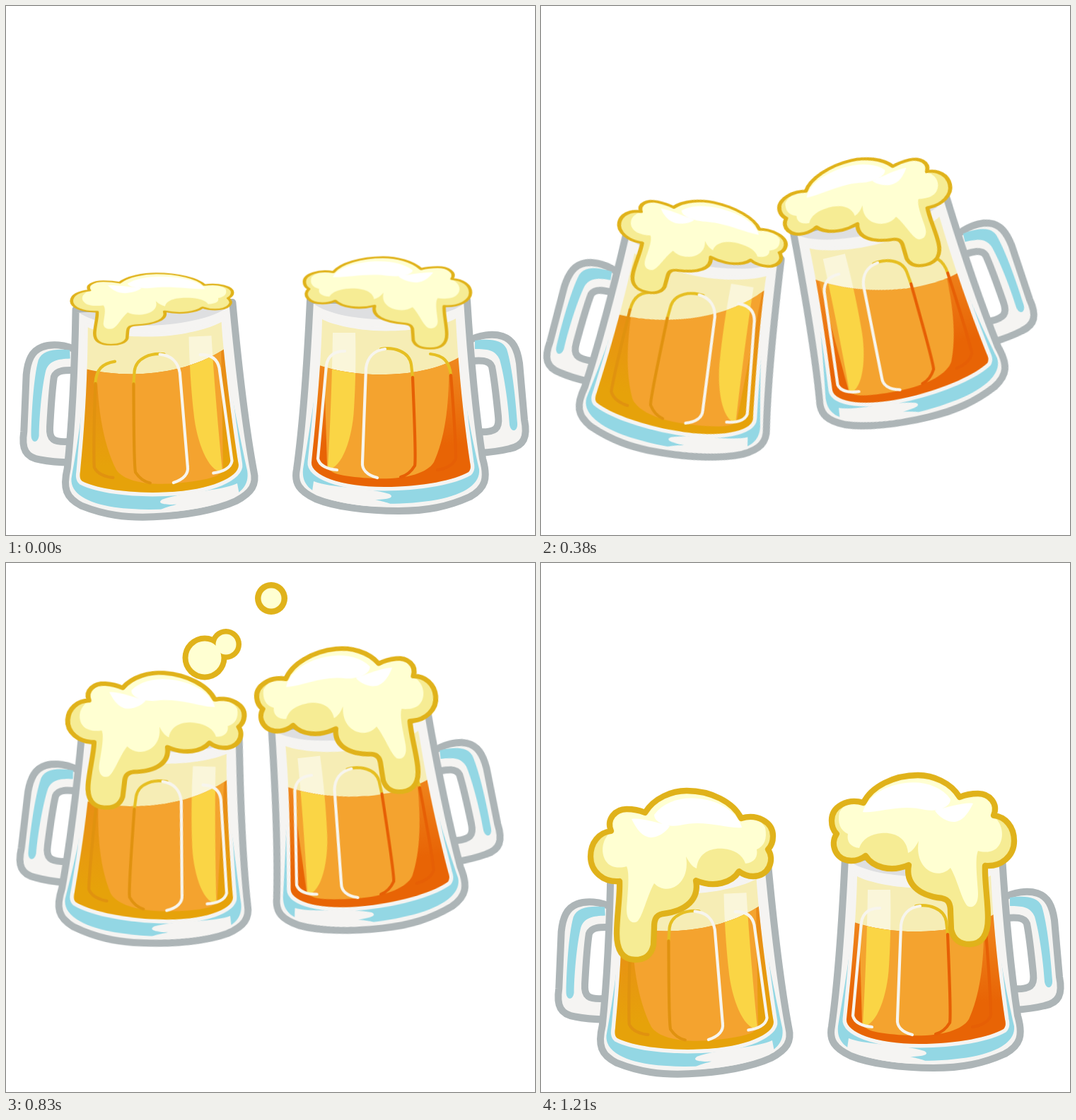
An HTML page that plays this animation: 748x748 px, repeating every 1250 ms.

```html
<!DOCTYPE html>
<html lang="en">
<head>
<meta charset="utf-8">
<title>Cheers</title>
<style>
@property --x { syntax: "<length>"; inherits: true; initial-value: 0px; }
@property --y { syntax: "<length>"; inherits: true; initial-value: 0px; }
@property --a { syntax: "<angle>"; inherits: true; initial-value: 0deg; }
@property --sink { syntax: "<length>"; inherits: true; initial-value: 0px; }

html, body { margin: 0; width: 100%; height: 100%; overflow: hidden; background: #fff; }
svg { display: block; width: 100%; height: 100%; }

/* 30 steps per loop; the delay snaps step starts to 10 ms */
.mug, .foam, .drop { animation: 1250ms steps(30) -5ms infinite; }
.mug { transform: translate(var(--x), var(--y)) rotate(var(--a)); }
.level { transform: translateY(var(--sink)) rotate(calc(-1 * var(--a))); }

.left { --dark: #e0920f; --deep: url(#amber); transform-origin: 215px 560px; animation-name: left; }
.right { --dark: #e65f05; --deep: url(#copper); transform-origin: 545px 555px; animation-name: right; }
.left .level { transform-origin: 210px 520px; }
.right .level { transform-origin: 540px 522px; }
.left .foam { transform-origin: 262px 419px; animation-name: foam-left; }
.right .foam { transform-origin: 533px 420px; animation-name: foam-right; }
.single { animation-name: single; }
.pair { animation-name: pair; }

.edge { fill: #f5f4f2; stroke: #adb5b7; stroke-width: 10; stroke-linejoin: round; }
.line { fill: none; stroke-width: 4.2; stroke-linecap: round; }
.white { stroke: #f7f5ee; }
.gold { stroke: #e6bf22; }
.dark { stroke: var(--dark); }
.crust { fill: none; stroke: #e0b21a; stroke-linejoin: round; vector-effect: non-scaling-stroke; }

@keyframes left {
  0% { --x: 0px; --y: 0px; --a: 0deg; --sink: 0px; animation-timing-function: steps(6); }
  20% { --x: -2px; --y: -63px; --a: 5deg; --sink: 4px; animation-timing-function: steps(4); }
  33.333% { --x: -10px; --y: -94px; --a: 14.5deg; --sink: 12px; animation-timing-function: steps(2); }
  40% { --x: -9px; --y: -104px; --a: 14.5deg; --sink: 14px; animation-timing-function: steps(4); }
  53.333% { --x: -6px; --y: -180px; --a: 9deg; --sink: 15px; animation-timing-function: steps(4); }
  66.667% { --x: -1px; --y: -184px; --a: 4.3deg; --sink: 8px; animation-timing-function: steps(4); }
  80% { --x: 0px; --y: -179px; --a: 0deg; --sink: 0px; animation-timing-function: steps(2); }
  86.667% { --x: 0px; --y: -64px; --a: 0deg; --sink: 0px; animation-timing-function: steps(1); }
  90% { --x: 0px; --y: -28px; --a: 0deg; --sink: 0px; animation-timing-function: steps(2); }
  96.667%, 100% { --x: 0px; --y: 0px; --a: 0deg; --sink: 0px; }
}
@keyframes right {
  0% { --x: 0px; --y: 0px; --a: 0deg; --sink: 0px; animation-timing-function: steps(6); }
  20% { --x: -19px; --y: -102px; --a: -6.8deg; --sink: 1px; animation-timing-function: steps(6); }
  40% { --x: -69px; --y: -150px; --a: -20deg; --sink: 8px; animation-timing-function: steps(4); }
  53.333% { --x: -83px; --y: -189px; --a: -14.5deg; --sink: 6px; animation-timing-function: steps(4); }
  66.667% { --x: -40px; --y: -195.5px; --a: -6.3deg; --sink: 4px; animation-timing-function: steps(4); }
  80% { --x: -2px; --y: -198px; --a: 0deg; --sink: 0px; animation-timing-function: steps(2); }
  86.667% { --x: -1px; --y: -71px; --a: 0deg; --sink: 0px; animation-timing-function: steps(1); }
  90% { --x: 0px; --y: -31px; --a: 0deg; --sink: 0px; animation-timing-function: steps(2); }
  96.667%, 100% { --x: 0px; --y: 0px; --a: 0deg; --sink: 0px; }
}
@keyframes foam-left {
  from { transform: scale(.882, .422); stroke-width: 5.2px; }
  to { transform: scale(1.004, 1.02); stroke-width: 8.4px; }
}
@keyframes foam-right {
  0% { transform: scale(.911, .54); stroke-width: 5.2px; animation-timing-function: steps(16); }
  53.333% { transform: scale(.965, .83); stroke-width: 7px; animation-timing-function: steps(14); }
  100% { transform: scale(1.003, 1.013); stroke-width: 8.4px; }
}
@keyframes single {
  0%, 33.333% { transform: translate(361px, 245px) scale(0); animation-timing-function: steps(2); }
  40% { transform: translate(361px, 202px) scale(.8); animation-timing-function: steps(4); }
  53.333% { transform: translate(372px, 104px) scale(.96); animation-timing-function: steps(4); }
  66.667% { transform: translate(375px, 50px) scale(1); animation-timing-function: steps(2); }
  73.333% { transform: translate(373px, 38px) scale(.88); animation-timing-function: steps(2); }
  80% { transform: translate(368px, 60px) scale(.6); animation-timing-function: steps(2); }
  86.667% { transform: translate(367px, 74px) scale(.3); animation-timing-function: steps(1); }
  90%, 100% { transform: translate(367px, 80px) scale(0); }
}
@keyframes pair {
  0%, 33.333% { transform: translate(270px, 330px) scale(0); animation-timing-function: steps(2); }
  40% { transform: translate(271px, 283px) scale(.78); animation-timing-function: steps(4); }
  53.333% { transform: translate(277px, 189px) scale(1); animation-timing-function: steps(4); }
  66.667% { transform: translate(281px, 134px) scale(1); animation-timing-function: steps(2); }
  73.333% { transform: translate(281px, 128px) scale(.85); animation-timing-function: steps(2); }
  80% { transform: translate(278px, 143px) scale(.59); animation-timing-function: steps(2); }
  86.667% { transform: translate(277px, 165px) scale(.28); animation-timing-function: steps(1); }
  90%, 100% { transform: translate(277px, 175px) scale(0); }
}
</style>
</head>
<body>
<svg viewBox="0 0 748 748">
  <defs>
    <linearGradient id="amber" gradientUnits="userSpaceOnUse" x1="0" y1="490" x2="0" y2="640">
      <stop stop-color="#e98a18"/><stop offset="1" stop-color="#e6a20a"/>
    </linearGradient>
    <linearGradient id="copper" gradientUnits="userSpaceOnUse" x1="0" y1="490" x2="0" y2="620">
      <stop stop-color="#f08a20"/><stop offset="1" stop-color="#e86405"/>
    </linearGradient>

    <path id="bowl" d="M124 442C150 456 200 461 240 459C270 457 300 450 313 443C314 500 322 590 328 645C330 662 290 680 225 680C170 680 125 670 106 659C102 655 103 650 104 645C112 590 120 520 124 442Z"/>
    <path id="stripe" d="M266 462H298C299 540 303 620 305 655C285 655 270 610 268 570C266 540 265 500 266 462Z"/>
    <clipPath id="inside"><use href="#bowl"/></clipPath>

    <g id="glass">
      <path class="edge" fill-rule="evenodd" d="M108 475C92 464 70 463 58 467C43 472 37 485 34 505L27 585C22 610 28 622 48 626C60 629 75 631 92 632L96 602C66 604 62 597 64 580C66 560 69 530 73 510C77 500 90 501 104 502Z"/>
      <path fill="#93d7e4" d="M97 473C75 470 58 472 52 485C44 510 39 560 37 590C36 602 46 604 48 592C50 560 56 520 62 500C68 486 80 485 97 485Z"/>
      <path class="edge" d="M108 416C104 480 98 560 86 640C78 668 82 682 104 694C135 708 165 714 205 714C250 714 295 708 322 697C345 686 353 675 349 655C340 590 334 500 330 416Z"/>
      <path fill="#dedfe1" d="M113 421C150 451 285 451 325 421Z"/>
      <path fill="#93d7e4" d="M119 490C112 560 101 610 91 655C89 675 110 690 150 698C200 707 260 705 300 696C330 688 342 676 340 655C334 620 326 570 321 530L300 500Z"/>
      <path fill="#f5f4f2" d="M325 672C300 682 250 680 218 690C208 696 225 698 238 698C225 701 208 705 215 708C260 709 310 700 327 686Z"/>
      <use href="#bowl" fill="#f6edb5" stroke="#f5f4f2" stroke-width="11"/>
      <use href="#bowl" fill="#f6edb5"/>
      <use href="#stripe" fill="#fff" opacity=".5"/>
    </g>

    <g id="beer" clip-path="url(#inside)">
      <rect x="90" y="430" width="250" height="260" style="fill:var(--deep)"/>
      <path fill="#f4a32f" d="M136 440C130 540 135 600 155 645C165 662 200 670 240 668C280 666 305 662 306 650L312 440Z"/>
      <use href="#stripe" fill="#fad545"/>
    </g>

    <g id="panels" class="line">
      <path class="gold" d="M160 492C142 494 133 502 131 522"/>
      <path class="dark" d="M131 522C128 560 124 610 124 640C128 650 140 655 150 656"/>
      <path class="gold" d="M230 485C212 482 190 488 187 507L185 525"/>
      <path class="dark" d="M185 525C182 600 180 640 182 650C188 660 194 664 202 666"/>
      <path class="white" d="M235 667C250 663 257 655 256 645L251 512C249 497 240 487 224 485"/>
      <path class="white" d="M281 488C298 488 305 496 307 508L319 640C317 650 305 655 292 656"/>
    </g>

    <path id="puff" d="M147 353C160 332 185 322 206 322C240 322 272 338 283 361C305 354 328 366 328 386C328 394 325 401 321 405C331 420 322 443 300 443C292 443 285 440 280 436C270 452 245 460 219 449C224 475 206 492 172 496C162 498 160 505 160 515L159 540C156 555 146 561 133 561C115 561 107 547 107 524C107 500 112 470 111 450C88 452 70 436 70 415C70 395 82 381 99 379C92 362 105 348 121 348C131 348 140 350 147 353Z"/>
    <g id="head">
      <use href="#puff" fill="#f6ec94" stroke="none"/>
      <path fill="#ffffd2" stroke="none" d="M97 382C86 392 84 410 92 422C98 431 110 432 121 429C126 440 122 470 121 490C121 505 128 511 136 507C144 500 150 470 160 453C178 472 212 455 205 415C210 425 215 430 220 432C222 410 240 402 258 404C272 405 285 412 289 425C302 424 307 415 305 405C316 400 320 390 317 374C308 360 295 358 283 361C272 338 240 322 206 322C185 322 160 332 147 353C130 346 105 346 98 365Z"/>
      <path fill="#fff" stroke="none" d="M160 356C175 335 205 328 235 335C262 341 280 358 284 374C262 376 230 362 196 371C180 374 160 368 160 356ZM128 362C140 360 160 366 182 372C175 384 158 391 150 387C140 384 133 372 128 362Z"/>
      <use href="#puff" class="crust"/>
    </g>
  </defs>

  <g class="drop single">
    <circle r="23" fill="#e0b21a"/><circle r="14.5" fill="#ffffd2"/>
  </g>
  <g class="drop pair">
    <g fill="#e0b21a"><circle r="31.5"/><circle cx="30" cy="-19" r="22"/></g>
    <g fill="#ffffd2"><circle r="23.5"/><circle cx="30" cy="-19" r="14.5"/></g>
  </g>

  <g class="mug left">
    <clipPath id="levelLeft"><path class="level" d="M20 470L112 513C170 527 250 523 307 486L400 420V800H20Z"/></clipPath>
    <use href="#glass" transform="translate(-3 8) rotate(-2.6 215 560)"/>
    <g clip-path="url(#levelLeft)"><use href="#beer" transform="translate(-3 8) rotate(-2.6 215 560)"/></g>
    <use href="#panels" transform="translate(-3 8) rotate(-2.6 215 560)"/>
    <g class="foam"><use href="#head"/></g>
  </g>

  <g class="mug right">
    <clipPath id="levelRight"><path class="level" d="M350 470L443 508C500 528 590 526 640 497L730 440V800H350Z"/></clipPath>
    <use href="#glass" transform="matrix(-1 0 0 1 760 0)"/>
    <g clip-path="url(#levelRight)"><use href="#beer" transform="matrix(-1 0 0 1 760 0)"/></g>
    <use href="#panels" transform="matrix(-1 0 0 1 760 0)"/>
    <g class="foam"><use href="#head" transform="matrix(-1 0 0 1 739 -22)"/></g>
  </g>
</svg>
</body>
</html>
```
